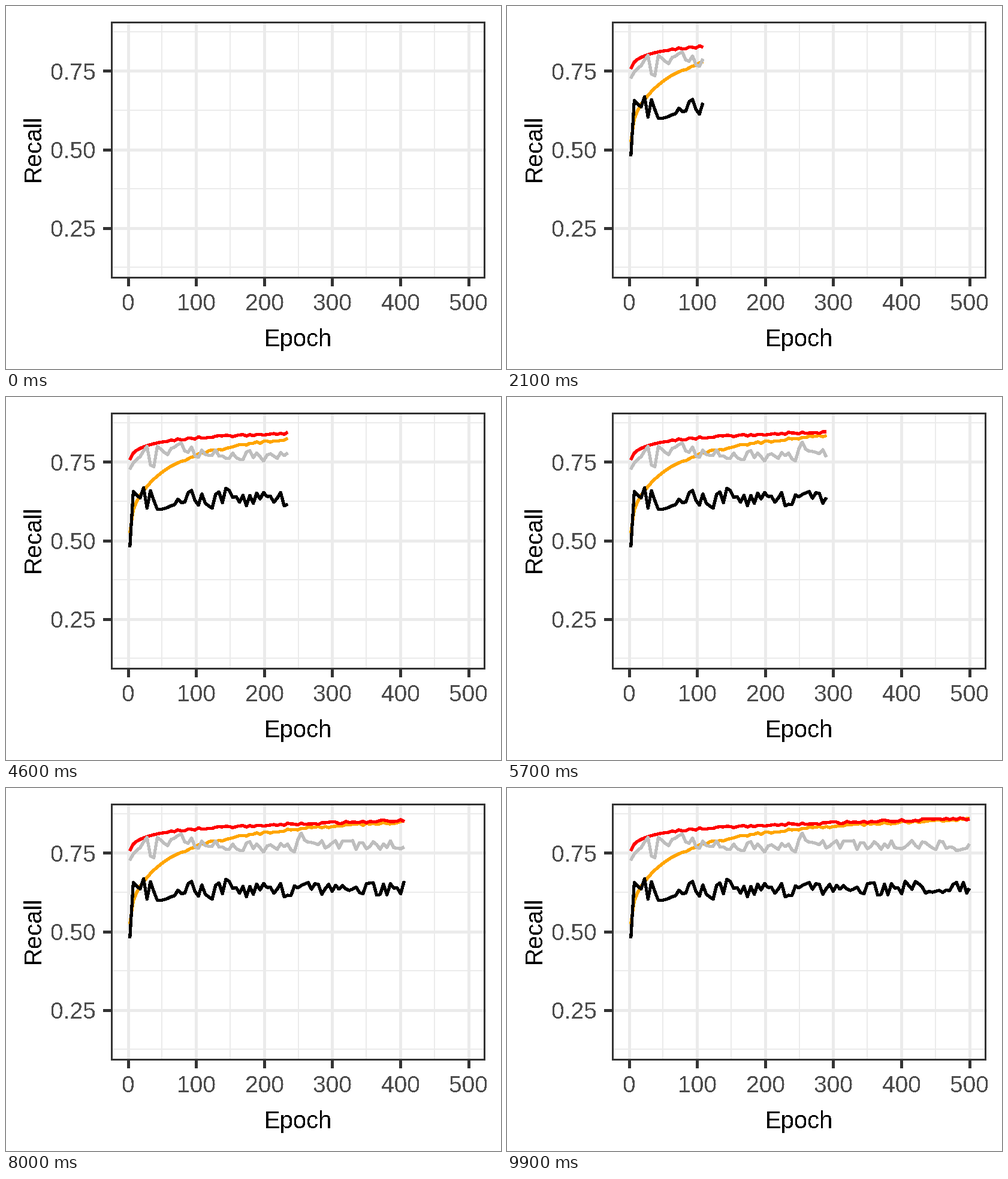
These frames come from a looping animation (826x606 px, 10000 ms). A matplotlib script:

```python
import numpy as np
import matplotlib.pyplot as plt
from matplotlib.animation import FuncAnimation
from matplotlib.patches import Rectangle

W, H, DPI = 826, 606, 100
N = 100
LEFT, RIGHT, TOP, BOTTOM = 175, 800, 26, 455
GRID, DARK, TEXT = "#EBEBEB", "#333333", "#4D4D4D"

plt.rcParams["font.family"] = "Liberation Sans"
plt.rcParams["text.antialiased"] = False


def pt(px):
    return px * 72 / DPI


def epoch_x(e):
    return 203.6 + 1.136 * e


def recall_y(r):
    return 239.6 - 525 * (r - 0.5)


fig = plt.figure(figsize=(W / DPI, H / DPI), dpi=DPI, facecolor="white")
ax = fig.add_axes([0, 0, 1, 1])
ax.set_xlim(0, W)
ax.set_ylim(H, 0)
ax.axis("off")


def stroke(xs, ys, color, px, z):
    return ax.plot(xs, ys, color=color, lw=pt(px), zorder=z, antialiased=False,
                   solid_capstyle="butt", solid_joinstyle="round")[0]


def label(x, y, s, color, px=40, **kw):
    ax.text(x, y, s, color=color, fontsize=pt(px), va="baseline", **kw)


# Panel: minor grid, major grid with ticks and labels, border
for e in range(50, 500, 100):
    stroke([epoch_x(e)] * 2, [TOP, BOTTOM], GRID, 2, 1)
for r in np.arange(0.125, 0.9, 0.25):
    stroke([LEFT, RIGHT], [recall_y(r)] * 2, GRID, 2, 1)

for e in range(0, 501, 100):
    x = epoch_x(e)
    stroke([x, x], [TOP, BOTTOM], GRID, 4.5, 2)
    stroke([x, x], [BOTTOM, BOTTOM + 12], DARK, 4.5, 2)
    label(x + 0.4, 508, str(e), TEXT, 39, ha="center")
for r in (0.25, 0.5, 0.75):
    y = recall_y(r)
    stroke([LEFT, RIGHT], [y, y], GRID, 4.5, 2)
    stroke([LEFT - 13, LEFT], [y, y], DARK, 4.5, 2)
    label(150.5, y + 14.5, f"{r:.2f}", TEXT, 39, ha="right")

label(487, 568.5, "Epoch", "black", ha="center")
label(56.5, 237, "Recall", "black", ha="center", rotation=90,
      rotation_mode="anchor")
ax.add_patch(Rectangle((LEFT + 1, TOP + 1), RIGHT - LEFT - 3,
                       BOTTOM - TOP - 3, fill=False, ec=DARK, lw=pt(3),
                       zorder=9, antialiased=False))

# Curves: a trend through a few (step, height) keys plus noise that fades in
step = np.arange(N)
xs = np.minimum(206.7 + 5.72 * step, 771.3)
rng = np.random.default_rng(7)


def curve(keys, noise):
    trend = np.interp(np.log1p(step), np.log1p(list(keys)),
                      list(keys.values()))
    fade = np.clip((step - 8) / 8, 0, 1)
    return trend + noise * fade * rng.uniform(-1, 1, N) - 0.5


series = [
    (curve({0: 227, 1: 189, 5: 150, 11: 120, 19: 98, 35: 79, 50: 68.5,
            65: 62, 99: 53}, 2), "#FFA500"),
    (curve({0: 105, 1: 94, 12: 73, 20: 69, 35: 63.5, 60: 58.5, 99: 52}, 2),
     "#FF0000"),
    (curve({0: 121, 3: 100, 5: 83, 6: 114, 7: 117, 8: 83, 11: 98, 14: 76,
            19: 94, 48: 101, 50: 78, 52: 96, 99: 96}, 9), "#BEBEBE"),
    (curve({0: 251, 1: 158, 3: 169, 4: 152, 5: 186, 6: 157, 8: 188, 11: 186,
            17: 163, 24: 176, 28: 162, 33: 172, 99: 166}, 12), "#000000"),
]
lines = [stroke([], [], color, 4.2, 4 + i)
         for i, (_, color) in enumerate(series)]


def update(k):
    n = k + 1 if k else 0
    for line, (ys, _) in zip(lines, series):
        line.set_data(xs[:n], ys[:n])
    return lines


anim = FuncAnimation(fig, update, frames=N, interval=100, repeat=True,
                     repeat_delay=0)
plt.show()
```
